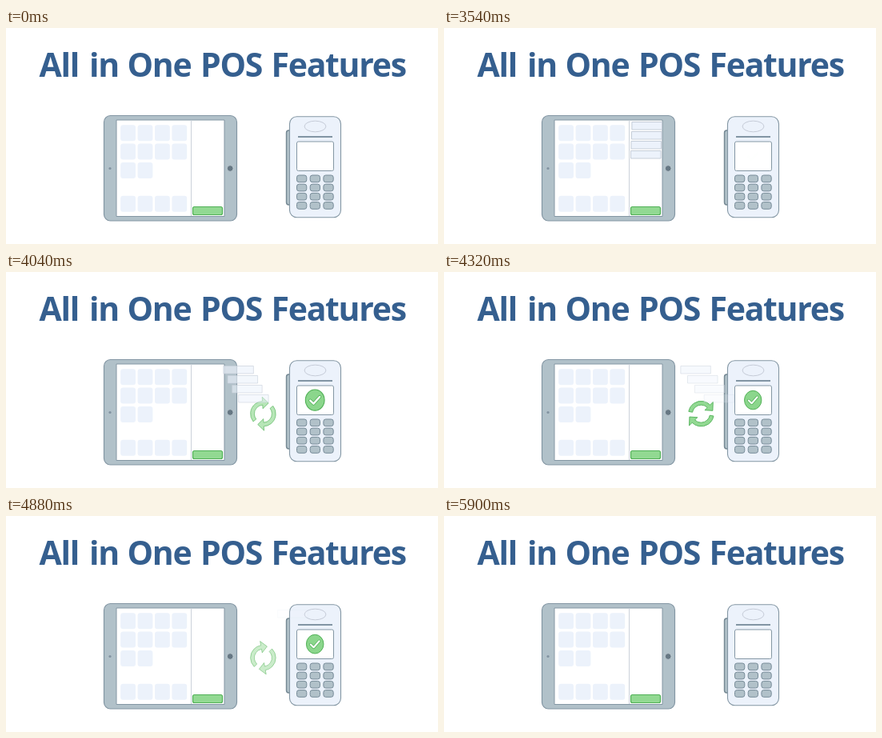
Animation of 540 by 270 pixels, one loop 6040 ms. Source, as an HTML page with a canvas:

```html
<!DOCTYPE html>
<html lang="en">
<head>
<meta charset="utf-8">
<title>All in One POS Features</title>
<style>
  html, body { margin: 0; width: 100%; height: 100%; overflow: hidden; background: #fff; }
  canvas { display: block; width: 540px; height: 270px; }
</style>
</head>
<body>
<canvas id="stage"></canvas>
<script>
const LOOP = 6040;
const SEND = 3540, SYNC_END = 5380, CHECK_END = 5900;
const STEEL = '#b1c1c9', EDGE = '#8497a4', ICE = '#ecf2fb';
const GREEN = '#92d992', GREEN_EDGE = '#50b056';

const canvas = document.getElementById('stage');
const ctx = canvas.getContext('2d');
const dpr = window.devicePixelRatio || 1;
canvas.width = 540 * dpr;
canvas.height = 270 * dpr;

const clamp = v => Math.max(0, Math.min(1, v));
const span = (t, from, to) => clamp((t - from) / (to - from));
const easeOut = p => 1 - (1 - p) * (1 - p);
const softEase = p => p - 0.02 * Math.sin(p * Math.PI * 2);

function paint(fill, stroke, width = 1) {
  if (fill) { ctx.fillStyle = fill; ctx.fill(); }
  if (stroke) { ctx.strokeStyle = stroke; ctx.lineWidth = width; ctx.stroke(); }
}

function box(x, y, w, h, r, fill, stroke, width) {
  ctx.beginPath();
  ctx.roundRect(x, y, w, h, r);
  paint(fill, stroke, width);
}

function oval(x, y, rx, ry, fill, stroke, width) {
  ctx.beginPath();
  ctx.ellipse(x, y, rx, ry, 0, 0, Math.PI * 2);
  paint(fill, stroke, width);
}

function title() {
  ctx.font = '700 41px "Open Sans", "Noto Sans", sans-serif';
  ctx.letterSpacing = '-1.3px';
  ctx.fillStyle = '#355f8f';
  const words = [['All', 41.5], ['in', 104], ['One', 151.5], ['POS', 243], ['Features', 331.5]];
  for (const [word, x] of words) ctx.fillText(word, x, 61.3);
}

function tablet() {
  box(122.5, 109.5, 166, 131.5, 8, STEEL, EDGE, 1.2);
  box(138, 115, 135, 120.5, 0, '#fff', EDGE);
  [4, 4, 2, 0, 4].forEach((count, row) => {
    const y = row < 4 ? 121.2 + row * 23.4 : 209.8;
    for (let i = 0; i < count; i++) box(143.2 + i * 21.4, y, 18.8, 20, 3, ICE);
  });
  box(231, 115.5, 1, 119.5, 0, '#cbd2da');
  box(233.5, 223.5, 37, 10, 2, GREEN, GREEN_EDGE, 1.2);
  oval(130, 175.5, 1.6, 1.6, '#8192a0');
  oval(280.2, 175.5, 3.9, 3.9, '#667783', '#c3d0d6', 0.9);
}

function terminal() {
  box(350.5, 128, 14, 93, 3, STEEL, '#748893', 1.4);
  box(354.5, 110.8, 64, 126, 9, ICE, EDGE, 1.1);
  oval(386.5, 123, 13.4, 6.8, null, '#c6ccd8');
  box(365, 135, 43, 2, 0, '#8295a4');
  box(363.5, 142, 46, 36.5, 2, '#fff', EDGE);
  for (let i = 0; i < 12; i++) {
    box(363.5 + i % 3 * 16.7, 184 + Math.floor(i / 3) * 11.2, 12.3, 8.7, 2.8, STEEL, '#788c99');
  }
}

function rows(t) {
  const enter = [[20, 440], [600, 920], [670, 990], [740, 1060]];
  const flight = [1490, 1310, 1160, 1000];
  for (let i = 0; i < 4; i++) {
    const shown = easeOut(span(t, ...enter[i]));
    const start = SEND - 20 + i * 8;
    const sent = span(t, start, start + flight[i]);
    ctx.globalAlpha = shown * (1 - sent);
    box(233.5 + 115 * softEase(sent), 117.5 + i * 12 - 4 * (1 - shown), 37.5, 9.5, 0, ICE, '#c6ced9');
  }
  ctx.globalAlpha = 1;
}

// Half ring ending in a triangular head
function arrow() {
  const head = -Math.PI / 4, tail = head - 2.18;
  const at = (r, angle) => ctx.lineTo(r * Math.cos(angle), r * Math.sin(angle));
  ctx.beginPath();
  ctx.arc(0, 0, 15.8, tail, head);
  at(21, head);
  at(15, head + 0.52);
  at(6.4, head);
  ctx.arc(0, 0, 11, head, tail, true);
  ctx.closePath();
  paint(GREEN, GREEN_EDGE, 0.9);
}

function sync(t) {
  if (t < SEND || t > SYNC_END) return;
  const turn = Math.pow(span(t, SEND, SYNC_END), 1.5) - 0.276;
  ctx.save();
  ctx.globalAlpha = span(t, SEND, 4300) * (1 - span(t, 4400, SYNC_END - 40));
  ctx.translate(321.4, 177.2);
  ctx.rotate(turn * Math.PI * 2);
  arrow();
  ctx.rotate(Math.PI);
  arrow();
  ctx.restore();
}

function tick(color, width) {
  ctx.beginPath();
  ctx.moveTo(-6, 0.5);
  ctx.lineTo(-1.8, 4.6);
  ctx.lineTo(6, -4.2);
  paint(null, color, width);
}

function check(t) {
  if (t < SEND || t >= CHECK_END) return;
  const beat = span(t, 3520, 5620) * 4;
  const size = 0.94 + 0.05 * Math.cos(beat * Math.PI * 2);
  ctx.save();
  ctx.globalAlpha = span(t, SEND, 3800);
  ctx.translate(386.2, 160.1);
  ctx.scale(size, size);
  oval(0, 0, 12, 13.2, '#8bd68c', GREEN_EDGE, 1.1);
  ctx.lineCap = ctx.lineJoin = 'round';
  tick(GREEN_EDGE, 4);
  tick('#fff', 2.4);
  ctx.restore();
}

function draw(t) {
  ctx.setTransform(dpr, 0, 0, dpr, 0, 0);
  ctx.fillStyle = '#fff';
  ctx.fillRect(0, 0, 540, 270);
  title();
  tablet();
  terminal();
  sync(t);
  rows(t);
  check(t);
}

const begin = performance.now();
function animate() {
  draw((performance.now() - begin) % LOOP);
  requestAnimationFrame(animate);
}
animate();
</script>
</body>
</html>
```
